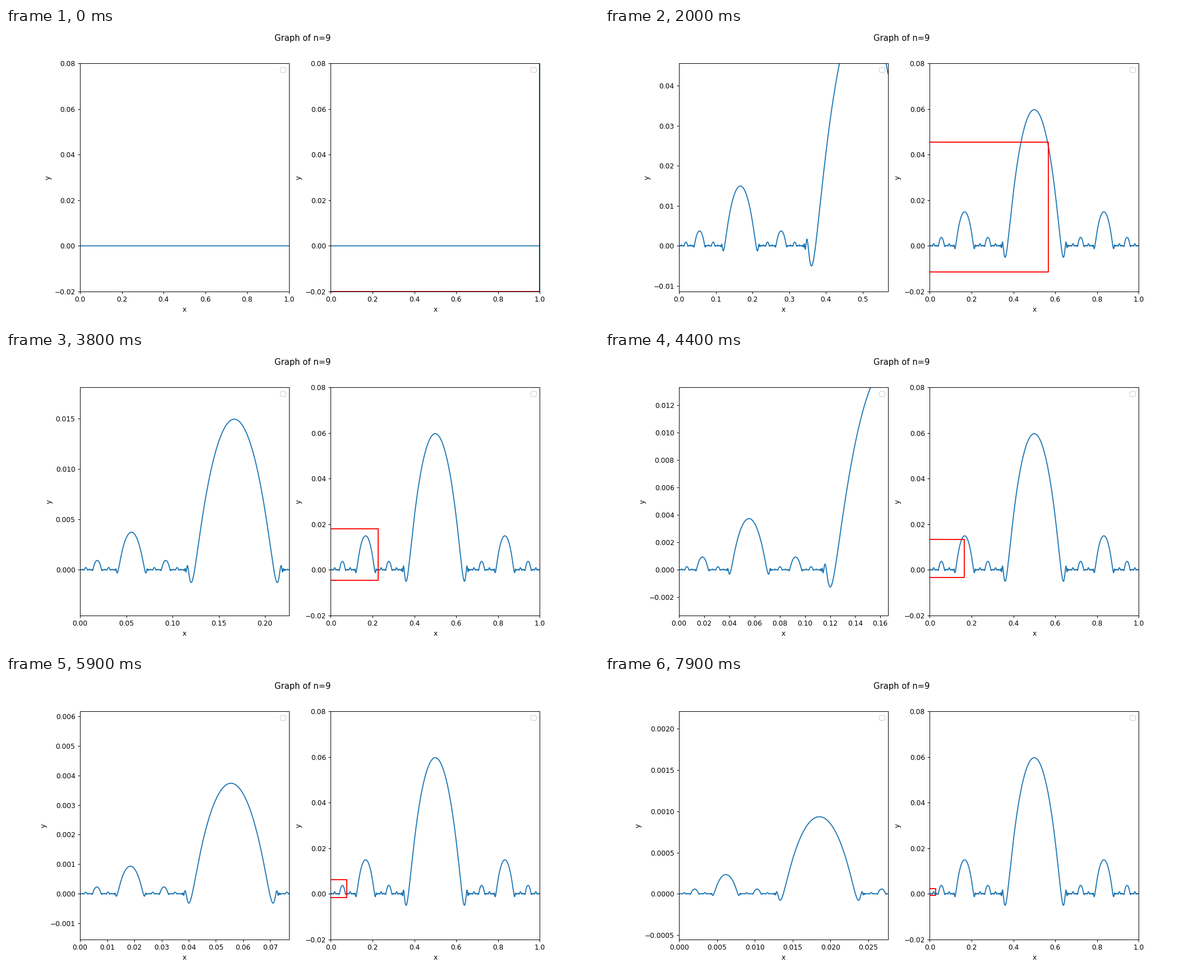
These frames come from a looping animation (1058 by 529 pixels, 8000 ms). A matplotlib script:

```python
import numpy as np
import matplotlib.pyplot as plt
from matplotlib.animation import FuncAnimation

DEPTH = 9
FRAMES = 80
SHRINK = 0.95
Y_LOW, Y_HIGH = -0.02, 0.08
BLUE = "#1f77b4"


def bump(t):
    """Oscillating bump on the unit interval, vanishing at both ends."""
    s = t * (1 - t)
    return s**2 * np.sin(1 / (np.pi * s))


def build_curves(x):
    """Curves with 0..DEPTH levels of middle-third gaps filled in."""
    y = np.zeros_like(x)
    free = np.ones(x.size, dtype=bool)
    curves = [y.copy()]
    for level in range(DEPTH):
        t = 3 * ((x * 3**level) % 1) - 1
        gap = free & (t > 1e-9) & (t < 1 - 1e-9)
        y[gap] = bump(t[gap]) / 4**level
        free &= ~gap
        curves.append(y.copy())
    return curves


x = np.linspace(0, 1, 150001)
curves = build_curves(x)

# 12 x 6 inches give 1058 x 529 pixels
fig, (zoom_ax, full_ax) = plt.subplots(1, 2, figsize=(12, 6), dpi=1058 / 12)
fig.suptitle("Graph of n=9")
for ax in (zoom_ax, full_ax):
    ax.set(xlabel="x", ylabel="y", xlim=(0, 1), ylim=(Y_LOW, Y_HIGH))
    ax.legend(handles=[], loc="upper right")

zoom_line, = zoom_ax.plot([], [], color=BLUE)
full_line, = full_ax.plot([], [], color=BLUE)
box, = full_ax.plot([], [], color="red")


def update(i):
    y = curves[min(i, DEPTH)]
    z = SHRINK ** max(i - DEPTH, 0)
    shown = min(int(z * x.size) + 20, x.size)
    zoom_line.set_data(x[:shown], y[:shown])
    full_line.set_data(x, y)
    box.set_data([0, z, z, 0], [Y_LOW * z, Y_LOW * z, Y_HIGH * z, Y_HIGH * z])
    zoom_ax.set_xlim(0, z)
    zoom_ax.set_ylim(Y_LOW * z, Y_HIGH * z)
    return zoom_line, full_line, box


anim = FuncAnimation(fig, update, frames=FRAMES, interval=100,
                     repeat=True, repeat_delay=0, blit=False)
plt.show()
```
